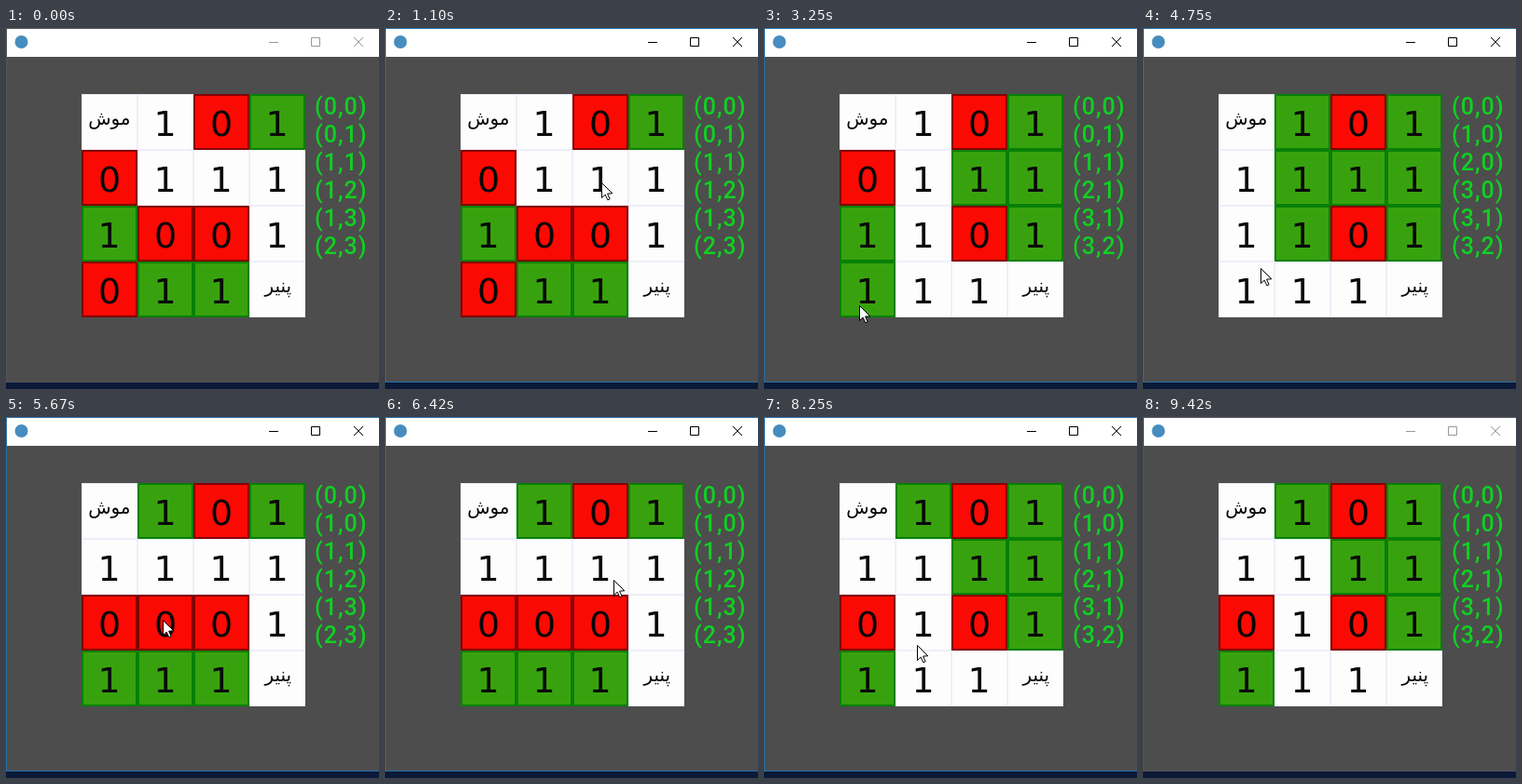
Animation, 400 px wide and 388 px high, one loop 9.49 s. Source, as an HTML page with a canvas:

```html
<!DOCTYPE html>
<html lang="fa">
<head>
<meta charset="utf-8">
<title>Maze</title>
<style>
  html, body { margin: 0; width: 100%; height: 100%; overflow: hidden; background: #4d4d4d; }
  canvas { display: block; }
</style>
</head>
<body>
<canvas id="stage" width="400" height="388"></canvas>
<script>
const ctx = document.getElementById('stage').getContext('2d');
const LOOP = 9490, FOCUS = 280, BLUR = 9420;
const ENTER = 70, EXIT = 8850;
const REST = 200; // the pointer stands still this long before and after each stop
const CELL = 60, LEFT = 81, TOP = 71;

const MAZE = ['1101', '0111', '1001', '0111'];

const go = (time, x, y) => ({ time, x, y });
const click = (time, x, y) => ({
  time, x, y, row: Math.floor((y - TOP) / CELL), col: Math.floor((x - LEFT) / CELL)
});

const STOPS = [
  go(ENTER, 306, 312),
  click(1270, 232, 166),
  click(1980, 236, 172),
  click(2480, 172, 226),
  click(3050, 102, 298),
  click(4070, 110, 174),
  go(4650, 126, 258),
  click(5100, 114, 226),
  click(5650, 168, 218),
  click(6560, 245, 175),
  click(7030, 240, 170),
  click(8030, 168, 242),
  go(8580, 100, 294),
  go(EXIT + REST, 244, 357)
];

const STYLES = {
  path: { fill: '#fdfdfd', edge: '#eeeefc', line: 1 },
  open: { fill: '#38a20e', edge: '#078007', line: 2 },
  wall: { fill: '#fb0a04', edge: '#850000', line: 2 }
};

function gridAt(t) {
  const grid = MAZE.map(row => [...row].map(Number));
  for (const { time, row, col } of STOPS) {
    if (row !== undefined && t >= time) grid[row][col] ^= 1;
  }
  return grid;
}

// Depth-first walk: down first, then right
function solve(grid, r = 0, c = 0) {
  if (r > 3 || c > 3 || !grid[r][c]) return null;
  if (r === 3 && c === 3) return [];
  const rest = solve(grid, r + 1, c) || solve(grid, r, c + 1);
  return rest && [[r, c], ...rest];
}

function pointerAt(t) {
  const next = STOPS.findIndex(stop => stop.time > t);
  const a = STOPS[next - 1], b = STOPS[next];
  const p = (t - a.time - REST) / (b.time - a.time - 2 * REST);
  const q = Math.min(1, Math.max(0, p));
  const e = q * q * (3 - 2 * q);
  return [Math.round(a.x + (b.x - a.x) * e), Math.round(a.y + (b.y - a.y) * e)];
}

function box(x, y, w, h, color) {
  ctx.fillStyle = color;
  ctx.fillRect(x, y, w, h);
}

function write(str, x, y, font, color) {
  ctx.font = font;
  ctx.fillStyle = color;
  ctx.fillText(str, x, y);
}

// Centres the visible ink rather than the advance width
function writeCentred(str, x, y, size) {
  ctx.font = `${size}px "DejaVu Sans", sans-serif`;
  const ink = ctx.measureText(str);
  const shift = (ink.actualBoundingBoxRight - ink.actualBoundingBoxLeft) / 2;
  write(str, x - shift, y, ctx.font, '#080808');
}

function drawWindow(active) {
  const edge = active ? '#2870a8' : '#55555a';
  box(0, 0, 400, 388, '#0b1a38');
  box(0, 0, 400, 381, edge);
  box(1, 1, 399, 379, '#4d4d4d');
  box(1, 1, 399, 30, '#fff');

  ctx.fillStyle = '#478cbf';
  ctx.beginPath();
  ctx.arc(16.5, 15, 7, 0, 7);
  ctx.fill();

  ctx.strokeStyle = active ? '#000' : '#999';
  ctx.lineWidth = 1;
  ctx.beginPath();
  ctx.moveTo(282, 15.5); ctx.lineTo(292, 15.5);
  ctx.rect(327.5, 10.5, 9, 9);
  ctx.moveTo(373, 10); ctx.lineTo(383, 20);
  ctx.moveTo(383, 10); ctx.lineTo(373, 20);
  ctx.stroke();
}

function drawCell(r, c, value, onPath) {
  const x = LEFT + c * CELL, y = TOP + r * CELL;
  const word = { 0: 'موش', 6: 'پنیر' }[r + c === 6 && r !== 3 ? -1 : r + c];
  const kind = word || onPath ? 'path' : value ? 'open' : 'wall';
  const { fill, edge, line } = STYLES[kind];
  box(x, y, CELL, CELL, edge);
  box(x + line, y + line, CELL - 2 * line, CELL - 2 * line, fill);
  if (word) writeCentred(word, x + 30, y + 33, 20);
  else writeCentred(String(value), x + 30, y + 44.5, 38);
}

const ARROW = new Path2D('M0 0V16L3.7 12.6L6.3 18.3L8.6 17.3L6.1 11.6L11.3 11.3Z');

function drawPointer([x, y]) {
  ctx.save();
  ctx.translate(x + 0.5, y + 0.5);
  ctx.fillStyle = '#fff';
  ctx.strokeStyle = '#000';
  ctx.fill(ARROW);
  ctx.stroke(ARROW);
  ctx.restore();
}

function drawSteps(path) {
  const line = (str, i) => write(str, 331, 63 + i * 30, '500 25px Roboto, sans-serif', '#10d022');
  ctx.letterSpacing = '1px';
  if (path) path.forEach((step, i) => line(`(${step})`, i + 1));
  else line('()', 0);
  ctx.letterSpacing = '0px';
}

function draw(t) {
  const grid = gridAt(t), path = solve(grid);
  const onPath = (r, c) => !!path && path.some(p => p[0] === r && p[1] === c);
  drawWindow(t >= FOCUS && t < BLUR);
  grid.forEach((row, r) => row.forEach((v, c) => drawCell(r, c, v, onPath(r, c))));
  drawSteps(path);
  if (t >= ENTER && t < EXIT) drawPointer(pointerAt(t));
}

const began = performance.now();
function frame() {
  draw((performance.now() - began) % LOOP);
  requestAnimationFrame(frame);
}
frame();
</script>
</body>
</html>
```
